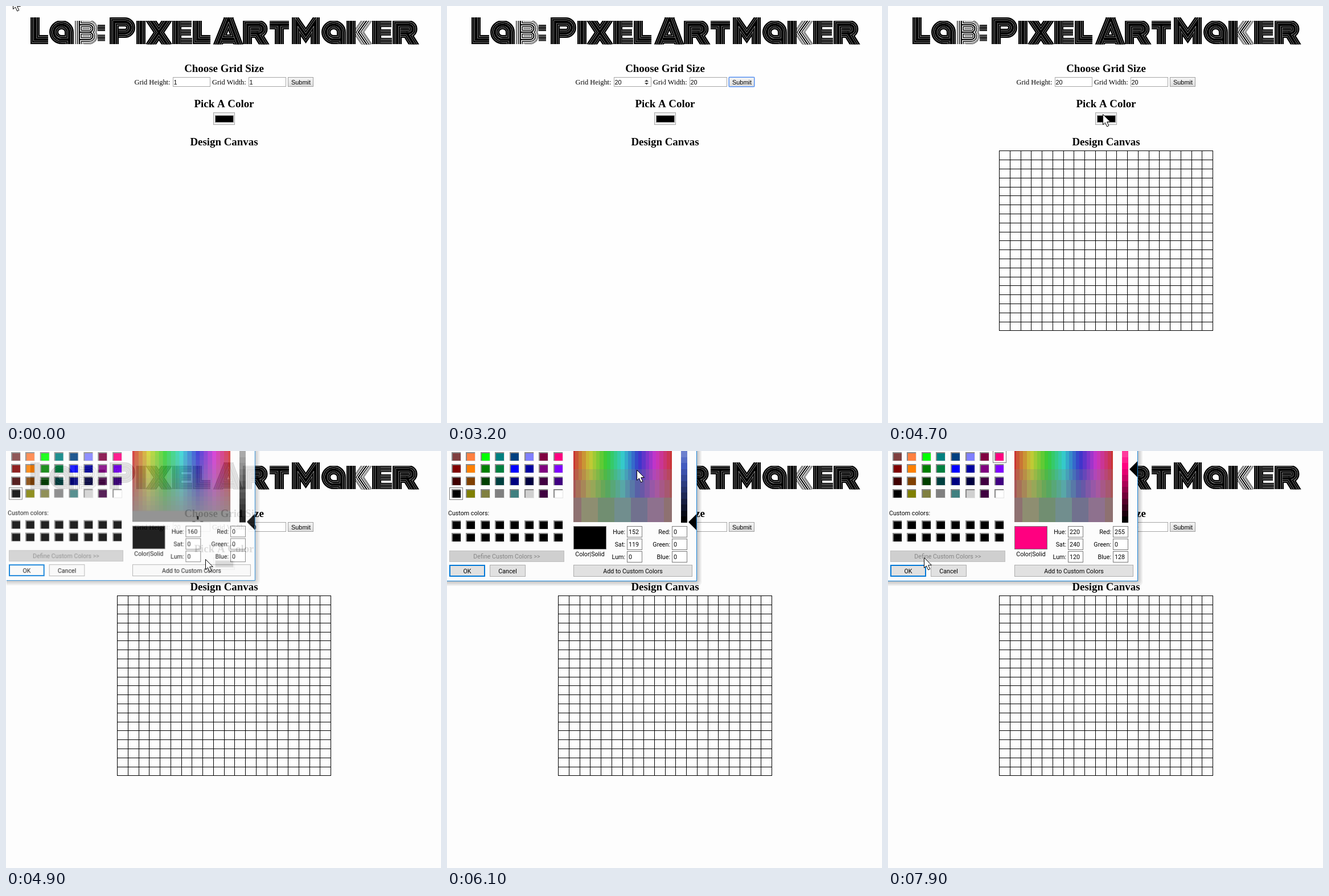
Animation of 764 by 733 pixels, one loop 8000 ms. Source, as an HTML page with a canvas:

```html
<!DOCTYPE html>
<html lang="en">
<head>
<meta charset="utf-8">
<title>Lab: Pixel Art Maker</title>
<style>
html, body { margin: 0; height: 100%; overflow: hidden; background: #fefefe; }
canvas { display: block; }
</style>
</head>
<body>
<canvas id="stage" width="764" height="733"></canvas>
<script>
const stage = document.getElementById('stage').getContext('2d');
const layer = new OffscreenCanvas(460, 250).getContext('2d');
let ctx = stage;
const LOOP = 8000;
const SERIF = '"Liberation Serif", serif';
const SANS = '"Liberation Sans", sans-serif';
const UI = '10.7px Roboto, sans-serif';

function rect(x, y, w, h, fill) {
  ctx.fillStyle = fill;
  ctx.fillRect(x, y, w, h);
}

function box(x, y, w, h, fill, border, line = 1) {
  rect(x, y, w, h, border);
  rect(x + line, y + line, w - 2 * line, h - 2 * line, fill);
}

function text(str, x, y, font, align = 'left', color = '#000') {
  ctx.font = font;
  ctx.textAlign = align;
  ctx.fillStyle = color;
  ctx.fillText(str, x, y);
}

function polygon(points, fill, stroke) {
  ctx.beginPath();
  points.forEach(([x, y]) => ctx.lineTo(x, y));
  ctx.closePath();
  ctx.fillStyle = fill;
  ctx.fill();
  if (stroke) {
    ctx.strokeStyle = stroke;
    ctx.lineWidth = 1;
    ctx.stroke();
  }
}

// ---- Title: inline display lettering built from nested strokes ----
const glyphs = {
  L: 'M8 0V39H31',
  a: 'M35 47V26A13.5 13 0 1 0 21.5 39H35',
  b: 'M8 6V47M8 13H25a6 6 0 0 1 0 13H8M25 26a6.5 6.5 0 0 1 0 13H8',
  ':': 'M0 18.5H13M0 36H13',
  P: 'M8 47V8H27a10 10 0 0 1 0 20H16',
  I: 'M8 0V47',
  X: 'M6 2L39 51M39 2L6 51',
  '=': 'M15 11.5H34M15 26.5H33M15 41.5H35',
  A: 'M4 56L28 -4M24 -4L46 56M14 38H36',
  R: 'M8 47V13H28a7.5 7.5 0 0 1 0 15H14M24 26L40 52',
  T: 'M0 13H34M17 13V47',
  M: 'M8 47V8L24.5 32L41 8V47',
  '<': 'M38 2L21 26L38 51'
};
// [glyph, x, top]; I and = together make an E, I and < make a K
const title = [
  ['L', 43, 0], ['a', 76, 6], ['b', 121, 6], [':', 161, 6], ['P', 182, 0], ['I', 229, 6],
  ['X', 246, 6], ['I', 292, 6], ['=', 292, 6], ['L', 328, 6], ['A', 365, 0], ['R', 416, 6],
  ['T', 463, 6], ['M', 502, 0], ['a', 554, 6], ['<', 598, 6], ['I', 598, 6],
  ['I', 643, 6], ['=', 643, 6], ['R', 679, 6]
];

function drawTitle() {
  for (const [name, x, top] of title) {
    const path = new Path2D(glyphs[name]);
    const width = ':='.includes(name) ? 11 : 16;
    const light = 'b<'.includes(name);
    const gap = light ? 3 : 0.8;
    const stroke = (w, color) => {
      ctx.lineWidth = w;
      ctx.strokeStyle = color;
      ctx.stroke(path);
    };
    ctx.save();
    ctx.translate(x, 20);
    ctx.beginPath();
    ctx.rect(-2, top, 60, 47.5 - top);
    ctx.clip();
    stroke(width, '#000');
    if (light) {
      stroke(width - 1.6, '#fff');
      stroke(width - 3.6, '#222');
    }
    for (const part of [0.68, 0.32]) {
      stroke(width * part, '#fff');
      stroke(width * part - gap, '#000');
    }
    ctx.restore();
  }
}

// ---- Page ----
function focusRing(x, y, w, h) {
  ctx.lineWidth = 1;
  ctx.strokeStyle = '#a3c2f8';
  ctx.beginPath();
  ctx.roundRect(x - 0.5, y - 0.5, w + 1, h + 1, 2);
  ctx.stroke();
  ctx.strokeStyle = '#5b93ee';
  ctx.strokeRect(x + 0.5, y + 0.5, w - 1, h - 1);
}

function numberInput(x, value, { focus, selected, caret, spinner }) {
  box(x, 125, 66, 17, '#fff', '#a6a6a6');
  if (focus) focusRing(x, 125, 66, 17);
  if (selected) rect(x + 2, 128, 7, 12, '#3399ff');
  const font = '10.9px ' + SANS;
  text(value, x + 1.5, 138, font, 'left', selected ? '#fff' : '#000');
  if (caret) rect(Math.round(x + 1.5 + ctx.measureText(value).width), 128, 1, 12, '#000');
  if (spinner) {
    polygon([[x + 54, 133], [x + 57.5, 129.5], [x + 61, 133]], '#444');
    polygon([[x + 54, 135], [x + 57.5, 138.5], [x + 61, 135]], '#444');
  }
}

function drawForm(t) {
  const label = '12.4px ' + SERIF;
  const heading = 'bold 18.9px ' + SERIF;
  text('Choose Grid Size', 383, 116, heading, 'center');
  text('Pick A Color', 383, 178, heading, 'center');
  text('Design Canvas', 383, 245, heading, 'center');
  text('Grid Height:', 225.5, 138, label);
  text('Grid Width:', 362, 138, label);

  const inHeight = t >= 700 && t < 1800;
  numberInput(293, t < 1300 ? '1' : t < 1500 ? '' : t < 1700 ? '2' : '20', {
    focus: inHeight,
    caret: inHeight && t !== 1200,
    spinner: t >= 700 && t < 3300
  });
  const inWidth = t >= 1800 && t < 2600;
  numberInput(426, t < 2300 ? '1' : t < 2500 ? '2' : '20', {
    focus: inWidth,
    selected: inWidth && t < 2300,
    caret: inWidth && t >= 2300
  });

  const shade = ctx.createLinearGradient(0, 125, 0, 142);
  shade.addColorStop(0, '#f6f6f6');
  shade.addColorStop(1, '#dcdcdc');
  box(495, 125, 45, 17, shade, '#a0a0a0');
  if (t >= 2600 && t < 4100) focusRing(495, 125, 45, 17);
  text('Submit', 518, 138, '10.9px ' + SANS, 'center');

  box(364, 187, 38, 22, '#efefef', '#a6a6a6');
  box(367, 192, 33, 13, '#000', '#999');
}

function drawGrid() {
  for (let i = 0; i <= 20; i++) {
    rect(Math.round(195 + 18.75 * i), 254, 1, 317, '#000');
    rect(195, Math.floor(254.8 + 15.8 * i), 376, 1, '#000');
  }
}

// ---- Color dialog ----
const palette = [
  '#804040 #ff8040 #00ff00 #008080 #004080 #8080ff #800040 #ff0080',
  '#800000 #ff8000 #008000 #008040 #0000ff #0000a0 #800080 #8000ff',
  '#400000 #804000 #004000 #004040 #000080 #000040 #400040 #400080',
  '#000 #808000 #808040 #808080 #408080 #d0d0d0 #400040 #fff'
].map(row => row.split(' '));

const states = {
  start: { hue: 160, sat: 0, lum: 0, rgb: [0, 0, 0], pick: [0, 3] },
  blue: { hue: 152, sat: 119, lum: 0, rgb: [0, 0, 0], pick: [0, 3] },
  pink: { hue: 220, sat: 240, lum: 120, rgb: [255, 0, 128], pick: [7, 0] }
};

const levelY = level => 125 - level / 240 * 187;

function swatch(col, y, color) {
  const x = Math.round(7.5 + 25.65 * col);
  rect(x, y - 8, 17, 16, '#e3e3e3');
  rect(x, y - 8, 16, 15, '#888');
  rect(x + 2, y - 6, 14, 13, color);
}

function drawSpectrum(fading) {
  const bands = fading
    ? Array.from({ length: 14 }, (_, i) => [i * 8, i * 8 + 8, 24])
    : [[0, 32, 28], [32, 51, 28], [51, 82, 20], [82, 125, 6]];
  for (const [top, bottom, count] of bands) {
    const sat = (125 - (top + bottom) / 2) / 187 * 100;
    const width = 173 / count;
    for (let i = 0; i <= count; i++) {
      const left = Math.max(222, Math.round(222 + (i - 0.5) * width));
      const right = Math.min(395, Math.round(222 + (i + 0.5) * width));
      rect(left, top, right - left, bottom - top, `hsl(${i / count * 360} ${sat}% 50%)`);
    }
  }
  if (fading) rect(222, 106, 173, 19, '#858585');
}

function drawMarker({ hue, sat }) {
  const x = Math.round(222 + hue / 240 * 173), y = Math.round(levelY(sat));
  ctx.save();
  ctx.beginPath();
  ctx.rect(222, 0, 173, 125);
  ctx.clip();
  rect(x - 1, y - 10, 3, 6, '#000');
  rect(x - 9, y - 1, 5, 3, '#000');
  rect(x + 5, y - 1, 5, 3, '#000');
  ctx.restore();
}

function button(label, x, y, w, h, { fill = '#e1e1e1', border = '#adadad', line, color } = {}) {
  box(x, y, w, h, fill, border, line);
  text(label, x + w / 2, y + h / 2 + 4, UI, 'center', color);
}

function drawDialog(state, fading) {
  const { hue, sat, lum, rgb, pick } = state;
  for (let i = 0; i < 4; i++) {
    ctx.fillStyle = 'rgba(0,0,0,.055)';
    ctx.beginPath();
    ctx.roundRect(-20, -20, 467 - 2 * i, 257 - 2 * i, 7);
    ctx.fill();
  }
  rect(0, 0, 439, 229, '#1883d7');
  rect(0, 0, 438, 228, '#fcfcfc');

  palette.forEach((row, r) => row.forEach((color, c) => swatch(c, 10 + 21.7 * r | 0, color)));
  ctx.strokeStyle = '#000';
  ctx.lineWidth = 1;
  ctx.setLineDash([1, 1]);
  ctx.strokeRect(Math.round(4 + 25.65 * pick[0]) + 0.5, Math.round(21.8 * pick[1]) - 0.5, 23, 21);
  ctx.setLineDash([]);
  text('Custom colors:', 2, 113, UI);
  for (let c = 0; c < 8; c++) {
    swatch(c, 130, '#000');
    swatch(c, 152, '#000');
  }

  const plain = fading ? '#f8f8f8' : '#e1e1e1';
  button('Define Custom Colors >>', 4, 175, 202, 20, { fill: '#cfcfcf', border: '#bfbfbf', color: '#858585' });
  button('OK', 4, 200, 63, 21, { fill: plain, border: '#0078d7', line: 2 });
  button('Cancel', 75, 200, 63, 21, { fill: plain });
  button('Add to Custom Colors', 222, 200, 209, 21, { fill: plain });

  drawSpectrum(fading);
  if (state === states.start) drawMarker(state);
  for (let i = 0; i < 12; i++) {
    const y = Math.round(125 - 10.42 * (i + 1));
    rect(411, y, 11, 11, `hsl(${hue * 1.5} ${sat / 2.4}% ${i * 5.6}%)`);
  }
  const tip = Math.round(levelY(lum));
  polygon([[424, tip], [438, tip - 14], [438, tip + 14]], '#000');

  box(222, 132, 58, 41, `rgb(${rgb})`, '#777');
  text('Color|Solid', 251, 185, UI, 'center');
  const fields = [
    ['Hue:', hue, 'Red:', rgb[0]],
    ['Sat:', sat, 'Green:', rgb[1]],
    ['Lum:', lum, 'Blue:', rgb[2]]
  ];
  fields.forEach(([nameA, a, nameB, b], i) => {
    const y = 132 + 22 * i;
    [[nameA, a, 316], [nameB, b, 395]].forEach(([name, value, x]) => {
      text(name, x - 3, y + 14, UI, 'right');
      box(x, y, 27, 20, '#fff', '#7a7a7a');
      text(value, x + 3, y + 14, UI);
    });
  });
}

// ---- Pointer ----
const route = [
  [0, 12, -13], [600, 340, 138], [700, 333, 134], [3100, 333, 134], [3200, 380, 138],
  [3500, 440, 182], [3900, 517, 136], [4200, 517, 136], [4700, 377, 190], [4800, 362, 190],
  [4900, 350, 190], [5100, 350, 190], [5600, 333, 60], [5800, 333, 33], [6100, 333, 33],
  [6600, 152, 20], [6800, 152, 20], [7000, 178, 8], [7200, 178, 8], [7300, 190, 10],
  [7500, 199, 10], [7700, 199, 10], [7900, 63, 187], [8000, 63, 187]
];
const arrow = [[0, 0], [0, 18], [4, 14.5], [7.2, 21.5], [10.3, 20], [7.2, 13.3], [12.8, 13]];

function drawPointer(t) {
  const i = route.findIndex(([time]) => time > t);
  const [t0, x0, y0] = route[i - 1], [t1, x1, y1] = route[i];
  const k = (t - t0) / (t1 - t0);
  const x = Math.round(x0 + (x1 - x0) * k), y = Math.round(y0 + (y1 - y0) * k);
  if (t >= 700 && t <= 3200) {
    // A white text beam, seen only where it crosses something dark
    rect(x, y - 8, 1, 17, '#fff');
    return;
  }
  polygon(arrow.map(([dx, dy]) => [x + dx + 0.5, y + dy + 0.5]), '#fff', '#000');
}

// The dialog is composed as one layer so that it can fade in as a whole
function showDialog(t) {
  const fading = t < 5100;
  const state = t < 5800 ? states.start : t < 7400 ? states.blue : states.pink;
  ctx = layer;
  ctx.clearRect(0, 0, 460, 250);
  drawDialog(state, fading);
  ctx = stage;
  ctx.save();
  if (fading) {
    ctx.globalAlpha = t < 4900 ? 0.4 : 0.87;
    ctx.transform(0.995, 0, 0, 0.996, 1, 0);
  }
  ctx.drawImage(layer.canvas, 0, 0);
  ctx.restore();
}

function draw(t) {
  rect(0, 0, 764, 733, t < 4900 ? '#fefefe' : '#fdfdfd');
  drawTitle();
  drawForm(t);
  if (t >= 4100) drawGrid();
  if (t >= 4800) showDialog(t);
  drawPointer(t);
}

function frame() {
  draw(Math.floor(performance.now() % LOOP / 100) * 100);
  requestAnimationFrame(frame);
}
frame();
</script>
</body>
</html>
```
